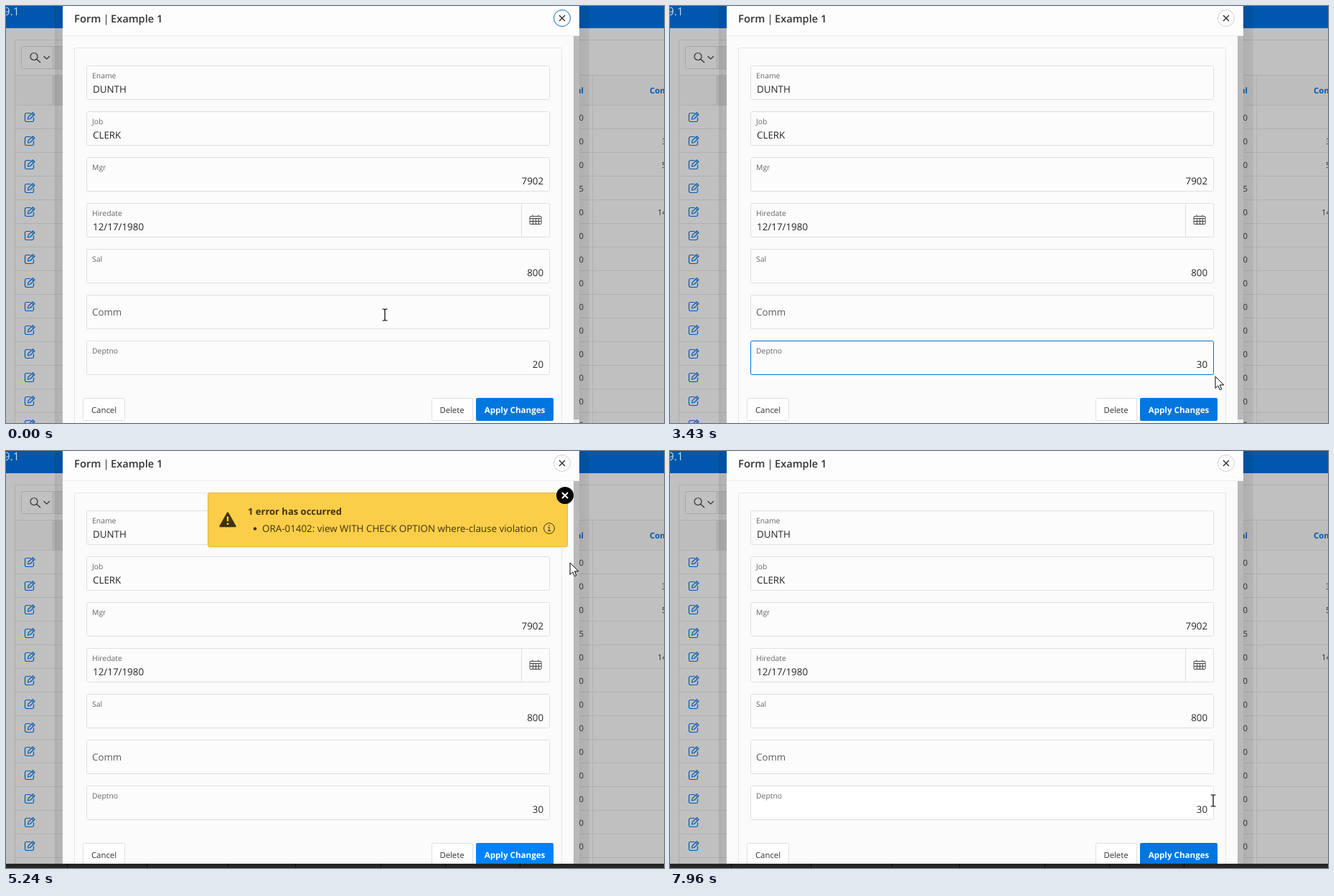
Write an HTML page that moves like this. It is 917 px wide and 582 px high and loops after 8000 ms.

```html
<!DOCTYPE html>
<html lang="en">
<head>
<meta charset="utf-8">
<title>Form dialog</title>
<style>
  html, body { margin: 0; width: 100%; height: 100%; overflow: hidden; background: #c0c0c0; }
  svg { display: block; font-family: "Open Sans", "Noto Sans", sans-serif; text-rendering: geometricPrecision; }
</style>
</head>
<body>
<svg id="stage" width="917" height="582" viewBox="0 0 917 582">
  <defs>
    <g id="edit" fill="none" stroke="#0a57a8" stroke-width="1.2" stroke-linejoin="round">
      <path d="M1.5-5.500h-6a2 2 0 0 0-2 2v8a2 2 0 0 0 2 2h8a2 2 0 0 0 2-2v-4"/>
      <path d="M-2.500 3l.6-3.200L4.500-6.200l2.500 2.500L.6 2.500zM2.900-4.600l2.500 2.500"/>
    </g>
    <linearGradient id="shade">
      <stop offset="0" stop-opacity=".09"/><stop offset="1" stop-opacity=".05"/>
    </linearGradient>
    <path id="arrow" d="M0 0v16.500l3.800-3.600 2.500 5.800 2.500-1.100-2.500-5.700h5.400z" fill="#fff" stroke="#000"/>
    <path id="hand" fill="#fff" stroke="#000" stroke-linejoin="round"
      d="M-1.500 1.500a1.600 1.600 0 0 1 3.200 0v6q1.600-1.400 3 .2 1.600-1 2.800.6 2.300-.6 2.300 1.700v5q0 2-1.500 4v3.500h-8.500v-3l-4.600-6.500q-1.200-2.500.6-2.500 1.300 0 2.700 2zM1.700 7.500v4M4.700 8v3.500M7.500 9v2.500"/>
    <path id="beam" d="M-3.500-8h2.500l1 1 1-1h2.500M0-7v14M-3.500 8h2.500l1-1 1 1h2.500" fill="none" stroke="#000" stroke-width="1.2"/>
  </defs>
  <g id="page"></g>
  <g id="dialog"></g>
  <g id="taskbar"></g>
  <g id="alert"></g>
  <use id="cursor"/>
</svg>
<script>
const $ = id => document.getElementById(id);
const rect = (x, y, w, h, fill, more = '') =>
  `<rect x="${x}" y="${y}" width="${w}" height="${h}" fill="${fill}" ${more}/>`;
const box = (x, y, w, h, fill, stroke, more = '') =>
  rect(x + .5, y + .5, w - 1, h - 1, fill, `stroke="${stroke}" rx="2" ${more}`);
const text = (x, y, str, size, fill, more = '') =>
  `<text x="${x}" y="${y}" font-size="${size}" fill="${fill}" ${more}>${str}</text>`;
const path = (d, stroke, width = 1, more = '') =>
  `<path d="${d}" fill="none" stroke="${stroke}" stroke-width="${width}" ${more}/>`;
const END = 'text-anchor="end"', MID = 'text-anchor="middle"', BOLD = 'font-weight="700"';

function drawPage() {
  let s = rect(0, 0, 917, 582, '#c0c0c0') + rect(0, 0, 917, 31, '#0057ac');
  s += text(18.5, 13, '9.1', 15.5, '#c9d9ea', END);
  s += path('M12.500 582V47.500H917M12 96.500H917', '#adadad');
  s += rect(13, 97, 904, 41, '#bdbdbd');
  s += box(21, 56, 80, 32, '#c1c1c1', '#a6a6a6');
  s += '<circle cx="39" cy="70.500" r="5" fill="none" stroke="#333" stroke-width="1.200"/>';
  s += path('M42.500 74l5.500 5', '#333', 1.3) + path('M52.500 70l4.200 4 4.200-4', '#333', 1.2);
  s += rect(64, 57, 15, 30, '#b5b5b5') + rect(64, 97, 15, 41, '#b0b0b0');
  for (let i = 0; i < 14; i++) {
    const y = 155 + 33 * i;
    s += path(`M13 ${y - 16.5}H917`, '#b0b0b0') + `<use href="#edit" x="33" y="${y}"/>`;
    s += text(805, y + 4.5, i === 3 ? '5' : '0', 11.4, '#333', END);
  }
  s += path('M817.500 97V582', '#b0b0b0');
  s += text(805, 122, 'Sal', 11.3, '#0a57a8', END + BOLD.padStart(18));
  s += text(897, 122, 'Comm', 11.3, '#0a57a8', BOLD);
  s += text(914, 192.5, '300', 11.4, '#333') + text(914, 225.5, '500', 11.4, '#333');
  s += text(908, 291.5, '1400', 11.4, '#333');
  s += rect(68, 0, 11, 582, 'url(#shade)') + rect(799, 0, 14, 582, 'url(#shade)');
  $('page').innerHTML = s;
}

const fields = [
  ['Ename', 'DUNTH'], ['Job', 'CLERK'], ['Mgr', '7902', 1], ['Hiredate', '12/17/1980'],
  ['Sal', '800', 1], ['Comm', ''], ['Deptno', '', 1]
];

function drawField([label, value, right], i) {
  const y = 83 + 64 * i;
  let s = box(112, y, 646, 48, '#fcfcfc', '#dfdfdf', `id="box${i}"`);
  if (label === 'Comm') return s + text(120, y + 29, label, 13.3, '#5c5c5c');
  s += text(120, y + 18, label, 10.4, '#666');
  if (label === 'Deptno') s += rect(733, y + 23, 15, 19, '#3297fd', 'id="mark"');
  if (right) return s + text(749, y + 38, value, 13.3, '#262626', END + ` id="val${i}"`);
  return s + text(121, y + 38, value, 13.4, '#262626');
}

function drawDialog() {
  let s = rect(79, 0, 720, 582, '#fbfbfb') + rect(79, 0, 720, 41, '#fdfdfd');
  s += path('M79 41.500H799', '#ececec');
  const title = 'font-weight="600"';
  s += text(95, 23, 'Form', 14.8, '#333', title) + text(139.5, 23, '|', 14.8, '#333', MID)
     + text(146, 23, 'Example 1', 14.6, '#333', title);
  s += '<circle id="ring" cx="775" cy="17" r="11.500" fill="#fff"/>';
  s += path('M771 13l8 8m0-8l-8 8', '#333', 1.5);
  s += rect(791, 42, 8, 535, '#b9b9b9') + rect(791, 577, 8, 5, '#ececec');
  s += path('M95.500 582V58.500H774.500V582', '#e6e6e6');
  s += fields.map(drawField).join('');
  s += path('M718.500 276V322', '#dfdfdf');
  s += path('M731 293.500h14q1 0 1 1v9q0 1-1 1h-14q-1 0-1-1v-9q0-1 1-1zM730 296.500h16M730 300.500h16M734.500 297v7.500M738.500 297v7.500M742.500 297v7.500M734 291.500v2M742 291.500v2', '#444');
  s += box(107, 547, 59, 32, '#fff', '#dfdfdf') + text(136.5, 568, 'Cancel', 11.4, '#333', MID);
  s += box(593, 547, 58, 32, '#fff', '#dfdfdf') + text(621.5, 568, 'Delete', 11.3, '#333', MID);
  s += rect(655, 547, 108, 32, '#0076df', 'rx="2" id="apply"');
  s += text(709, 568, 'Apply Changes', 11.6, '#fff', `${MID} ${BOLD}`);
  $('dialog').innerHTML = s;
}

function drawTaskbar() {
  const gaps = [85, 196, 309, 403, 522, 612, 716];
  $('taskbar').innerHTML = rect(0, 576, 917, 6, '#262626') +
    gaps.map(x => rect(x, 576, 1, 6, '#0c0c0c')).join('');
}

function drawAlert() {
  const ink = '#40330a';
  let s = rect(281, 59, 502, 77, '#000', 'rx="4" opacity=".06"');
  s += box(281, 58, 502, 76, '#fbce4a', '#e2b638');
  s += `<path d="M309 86.500L319.500 105h-21z" fill="${ink}" stroke="${ink}" stroke-width="2.500" stroke-linejoin="round"/>`;
  s += path('M309 91.500v6.500M309 100.500v2.500', '#fbce4a', 2.4);
  s += text(337, 89, '1 error has occurred', 13, ink, BOLD);
  s += `<circle cx="347" cy="108.500" r="2.200" fill="${ink}"/>`;
  s += text(357, 113, 'ORA-01402: view WITH CHECK OPTION where-clause violation', 13.4, ink);
  s += `<circle cx="757" cy="108" r="7.400" fill="none" stroke="${ink}"/>`;
  s += path('M755.500 106.500h1.500v5M755 111.500h4M756.200 103.900h1.500', ink, 1.1);
  s += '<circle cx="779" cy="62" r="12"/>' + path('M775 58l8 8m0-8l-8 8', '#fff', 2);
  $('alert').innerHTML = s;
}

// pointer: time, shape, x, y
const moves = [
  [0, 'beam', 528, 431], [120, 'beam', 537, 437], [280, 'arrow', 584, 456],
  [440, 'beam', 642, 480], [600, 'beam', 698, 496], [760, 'beam', 729, 500],
  [930, 'beam', 735, 501], [1090, 'beam', 744, 501], [1240, 'beam', 747, 501],
  [1400, 'beam', 750, 501], [1520, 'beam', 752, 502], [1660, 'beam', 754, 502],
  [3180, 'beam', 756, 505], [3330, 'arrow', 760, 517], [3480, 'arrow', 761, 530],
  [3640, 'arrow', 756, 541], [3790, 'hand', 745, 554], [3940, 'hand', 734, 560],
  [4090, 'hand', 729, 563],
  [4940, 'arrow', 745, 480], [5090, 'arrow', 770, 300], [5240, 'arrow', 786, 156],
  [5370, 'arrow', 786, 132], [5500, 'arrow', 784, 115], [5640, 'arrow', 781, 102],
  [5770, 'arrow', 778, 93], [5900, 'arrow', 774, 84],
  [6020, 'arrow', 766, 80], [6160, 'hand', 771, 70], [6300, 'hand', 776, 68],
  [6430, 'hand', 779, 66], [6560, 'hand', 780, 66],
  [7420, 'arrow', 782, 84], [7560, 'arrow', 786, 165], [7690, 'arrow', 780, 300],
  [7820, 'arrow', 766, 425], [7960, 'beam', 757, 488]
];
const set = (id, attrs) => { for (const k in attrs) $(id).setAttribute(k, attrs[k]); };
const within = (t, a, b) => t >= a && t < b;

function render(t) {
  const [, shape, x, y] = moves.findLast(m => m[0] <= t);
  set('cursor', { href: '#' + shape, x, y });

  const focus = within(t, 930, 4240);
  set('ring', { stroke: t < 930 ? '#0a6cc7' : '#cfcfcf' });
  set('box6', { stroke: focus ? '#0572ce' : '#dfdfdf', fill: t >= 7960 ? '#fff' : '#fcfcfc' });

  const marked = within(t, 1090, 2220) ? (t < 1400 ? 1 : 2) : 0;
  set('mark', { width: marked * 7.5 });
  const light = n => marked >= n ? '#fff' : '#262626';
  $('val6').innerHTML = t < 2220
    ? `<tspan fill="${light(1)}">2</tspan><tspan fill="${light(2)}">0</tspan>`
    : t < 2750 ? '3' : '30';

  set('apply', { fill: within(t, 4240, 7420) ? '#0082ff' : '#0076df' });
  set('taskbar', { opacity: t >= 4500 ? 1 : 0 });
  set('alert', { opacity: within(t, 4500, 7420) ? (t < 4630 ? .5 : 1) : 0 });
}

drawPage();
drawDialog();
drawTaskbar();
drawAlert();
const start = performance.now();
function tick() {
  render((performance.now() - start) % 8000);
  requestAnimationFrame(tick);
}
tick();
</script>
</body>
</html>
```
